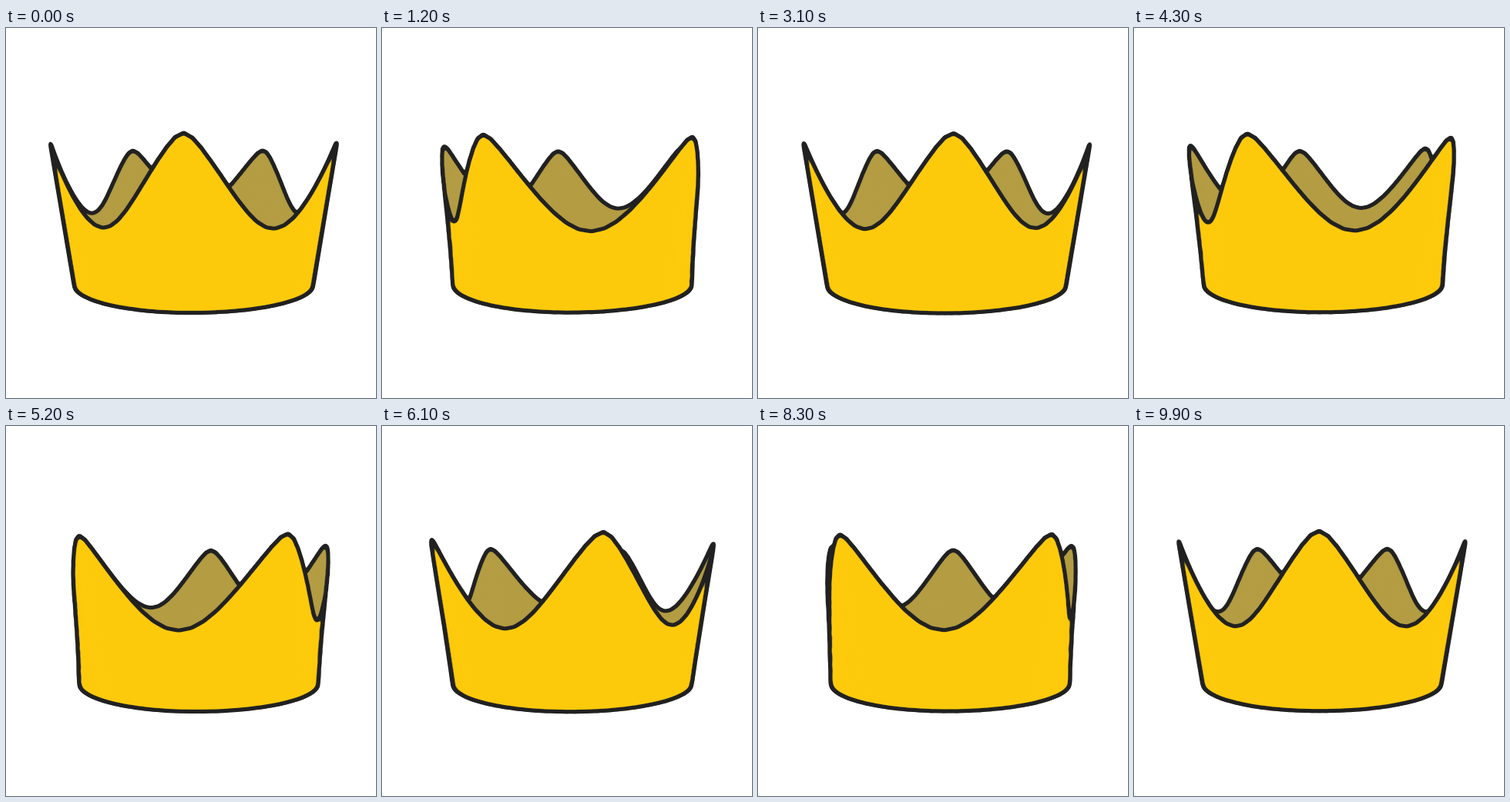
An HTML page without scripts for the animation above (10 s loop, 480 by 480 pixels).

```html
<!DOCTYPE html>
<html lang="en">
<head>
<meta charset="utf-8">
<title>Turning crown</title>
<style>
@property --spin { syntax: "<angle>"; inherits: true; initial-value: -2.4deg }
@property --h1 { syntax: "<number>"; inherits: false; initial-value: 0 }
@property --h2 { syntax: "<number>"; inherits: false; initial-value: 0 }
@property --s1 { syntax: "<number>"; inherits: false; initial-value: 0 }
@property --s2 { syntax: "<number>"; inherits: false; initial-value: 0 }
@property --c1 { syntax: "<number>"; inherits: false; initial-value: 0 }
@property --c2 { syntax: "<number>"; inherits: false; initial-value: 0 }
@property --z1 { syntax: "<number>"; inherits: false; initial-value: 1 }
@property --z2 { syntax: "<number>"; inherits: false; initial-value: 1 }
@property --bz1 { syntax: "<number>"; inherits: false; initial-value: 1 }
@property --bz2 { syntax: "<number>"; inherits: false; initial-value: 1 }
@property --m1 { syntax: "<number>"; inherits: false; initial-value: 0 }
@property --m2 { syntax: "<number>"; inherits: false; initial-value: 0 }
@property --x1 { syntax: "<number>"; inherits: false; initial-value: 0 }
@property --x2 { syntax: "<number>"; inherits: false; initial-value: 0 }
@property --y1 { syntax: "<number>"; inherits: false; initial-value: 0 }
@property --y2 { syntax: "<number>"; inherits: false; initial-value: 0 }
@property --bx1 { syntax: "<number>"; inherits: false; initial-value: 0 }
@property --bx2 { syntax: "<number>"; inherits: false; initial-value: 0 }
@property --by1 { syntax: "<number>"; inherits: false; initial-value: 0 }
@property --by2 { syntax: "<number>"; inherits: false; initial-value: 0 }

html, body { margin: 0; width: 100%; height: 100%; overflow: hidden; background: #fff }
svg { position: absolute; width: 0; height: 0 }
main {
  position: absolute; left: 0; top: 0; width: 480px; height: 480px;
  animation: spin 10s steps(100) infinite;
  /* slight sway, once per point */
  transform: translate(
    calc(2.5px - 3.5px * cos(5 * var(--spin) + 44deg)),
    calc(1px - 1.2px * cos(5 * var(--spin) + 88deg)));
}
@keyframes spin { from { --spin: -2.4deg } to { --spin: -218.4deg } }

.wall { position: absolute; inset: 0; filter: url(#ink) }
.inner { --fill: #b39c42 }
.outer { --fill: #fdca0b }

/* five points, each built from twenty narrow strips */
.wall div { --p: 0deg }
.wall div:nth-child(2) { --p: 72deg }
.wall div:nth-child(3) { --p: 144deg }
.wall div:nth-child(4) { --p: 216deg }
.wall div:nth-child(5) { --p: 288deg }
i { --j: 0 }
i:nth-child(2) { --j: 1 }
i:nth-child(3) { --j: 2 }
i:nth-child(4) { --j: 3 }
i:nth-child(5) { --j: 4 }
i:nth-child(6) { --j: 5 }
i:nth-child(7) { --j: 6 }
i:nth-child(8) { --j: 7 }
i:nth-child(9) { --j: 8 }
i:nth-child(10) { --j: 9 }
i:nth-child(11) { --j: 10 }
i:nth-child(12) { --j: 11 }
i:nth-child(13) { --j: 12 }
i:nth-child(14) { --j: 13 }
i:nth-child(15) { --j: 14 }
i:nth-child(16) { --j: 15 }
i:nth-child(17) { --j: 16 }
i:nth-child(18) { --j: 17 }
i:nth-child(19) { --j: 18 }
i:nth-child(20) { --j: 19 }

i {
  position: absolute; inset: 0; background: var(--fill);
  /* strip edges, finer near the point, with a slight overlap */
  --u1: (var(--j) / 10 - 1);
  --u2: (var(--j) / 10 - .89);
  --f1: (36deg * var(--u1) * (.65 + .35 * max(var(--u1), -1 * var(--u1))));
  --f2: (36deg * var(--u2) * (.65 + .35 * max(var(--u2), -1 * var(--u2))));
  /* rim height: 0 in the dips, near .9 at the points */
  --q1: hypot(sin(2.5 * var(--f1)), .12);
  --q2: hypot(sin(2.5 * var(--f2)), .12);
  --h1: calc(1 - .9 * var(--q1) - .1 * var(--q1) * var(--q1));
  --h2: calc(1 - .9 * var(--q2) - .1 * var(--q2) * var(--q2));
  --r1: (152 + 29 * var(--h1));
  --r2: (152 + 29 * var(--h2));
  --s1: sin(var(--spin) + var(--p) + var(--f1));
  --s2: sin(var(--spin) + var(--p) + var(--f2));
  --c1: cos(var(--spin) + var(--p) + var(--f1));
  --c2: cos(var(--spin) + var(--p) + var(--f2));
  /* perspective scale of rim and base */
  --z1: calc(1 / (1 - var(--r1) * var(--c1) / 597));
  --z2: calc(1 / (1 - var(--r2) * var(--c2) / 597));
  --bz1: calc(1 / (1 - .251 * var(--c1)));
  --bz2: calc(1 / (1 - .251 * var(--c2)));
  /* the front leans a little to the left */
  --m1: calc(244 - 3 * pow(max(0, var(--c1)), 4));
  --m2: calc(244 - 3 * pow(max(0, var(--c2)), 4));
  --x1: calc(var(--m1) + var(--r1) * var(--s1) * var(--z1));
  --x2: calc(var(--m2) + var(--r2) * var(--s2) * var(--z2));
  --y1: calc(188 + (56 - 104.4 * var(--h1)) * var(--z1));
  --y2: calc(188 + (56 - 104.4 * var(--h2)) * var(--z2));
  --bx1: calc(var(--m1) + 150 * var(--s1) * var(--bz1));
  --bx2: calc(var(--m2) + 150 * var(--s2) * var(--bz2));
  --by1: calc(188 + 135.3 * var(--bz1));
  --by2: calc(188 + 135.3 * var(--bz2));
  clip-path: polygon(
    calc(var(--x1) * 1px) calc(var(--y1) * 1px),
    calc(var(--x2) * 1px) calc(var(--y2) * 1px),
    calc(var(--bx2) * 1px) calc(var(--by2) * 1px),
    calc(var(--bx1) * 1px) calc(var(--by1) * 1px));
}
/* only strips that face the viewer or stand edge-on, by signed area */
.outer i {
  opacity: calc(150 + (var(--bx2) - var(--x1)) * (var(--by1) - var(--y2))
    - (var(--by2) - var(--y1)) * (var(--bx1) - var(--x2)));
}
</style>
</head>
<body>
<svg aria-hidden="true">
  <filter id="ink" x="0" y="0" width="100%" height="100%" color-interpolation-filters="sRGB">
    <feMorphology in="SourceAlpha" operator="dilate" radius="1"/>
    <feGaussianBlur stdDeviation="1.4"/>
    <feComponentTransfer result="edge"><feFuncA type="linear" slope="7" intercept="-.5"/></feComponentTransfer>
    <feFlood flood-color="#212121"/>
    <feComposite in2="edge" operator="in" result="line"/>
    <feGaussianBlur in="SourceGraphic" stdDeviation="2"/>
    <feComponentTransfer result="fill"><feFuncA type="linear" slope="9" intercept="-7.2"/></feComponentTransfer>
    <feMerge><feMergeNode in="line"/><feMergeNode in="fill"/></feMerge>
  </filter>
</svg>
<main>
<section class="wall inner">
<div><i></i><i></i><i></i><i></i><i></i><i></i><i></i><i></i><i></i><i></i><i></i><i></i><i></i><i></i><i></i><i></i><i></i><i></i><i></i><i></i></div>
<div><i></i><i></i><i></i><i></i><i></i><i></i><i></i><i></i><i></i><i></i><i></i><i></i><i></i><i></i><i></i><i></i><i></i><i></i><i></i><i></i></div>
<div><i></i><i></i><i></i><i></i><i></i><i></i><i></i><i></i><i></i><i></i><i></i><i></i><i></i><i></i><i></i><i></i><i></i><i></i><i></i><i></i></div>
<div><i></i><i></i><i></i><i></i><i></i><i></i><i></i><i></i><i></i><i></i><i></i><i></i><i></i><i></i><i></i><i></i><i></i><i></i><i></i><i></i></div>
<div><i></i><i></i><i></i><i></i><i></i><i></i><i></i><i></i><i></i><i></i><i></i><i></i><i></i><i></i><i></i><i></i><i></i><i></i><i></i><i></i></div>
</section>
<section class="wall outer">
<div><i></i><i></i><i></i><i></i><i></i><i></i><i></i><i></i><i></i><i></i><i></i><i></i><i></i><i></i><i></i><i></i><i></i><i></i><i></i><i></i></div>
<div><i></i><i></i><i></i><i></i><i></i><i></i><i></i><i></i><i></i><i></i><i></i><i></i><i></i><i></i><i></i><i></i><i></i><i></i><i></i><i></i></div>
<div><i></i><i></i><i></i><i></i><i></i><i></i><i></i><i></i><i></i><i></i><i></i><i></i><i></i><i></i><i></i><i></i><i></i><i></i><i></i><i></i></div>
<div><i></i><i></i><i></i><i></i><i></i><i></i><i></i><i></i><i></i><i></i><i></i><i></i><i></i><i></i><i></i><i></i><i></i><i></i><i></i><i></i></div>
<div><i></i><i></i><i></i><i></i><i></i><i></i><i></i><i></i><i></i><i></i><i></i><i></i><i></i><i></i><i></i><i></i><i></i><i></i><i></i><i></i></div>
</section>
</main>
</body>
</html>
```
